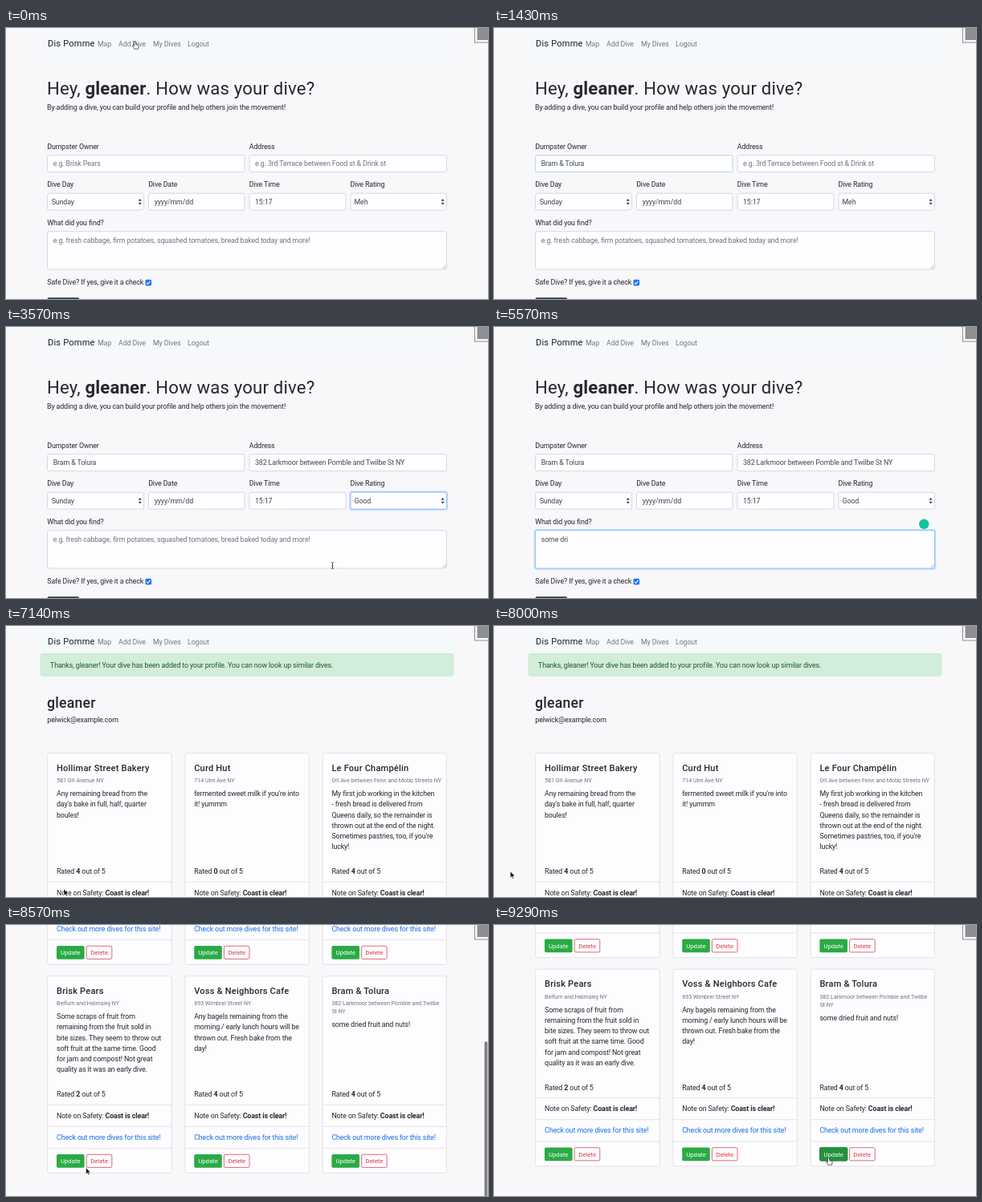
These frames come from a looping animation (600x338 px, 9.44 s). An HTML page:

```html
<!DOCTYPE html>
<html lang="en">
<head>
<meta charset="utf-8">
<title>Dive log</title>
<style>
html, body { margin: 0; width: 100%; height: 100%; overflow: hidden; background: #f8f7fa; }
svg { display: block; width: 600px; height: 338px; }
text { font-family: Roboto, Inter, sans-serif; white-space: pre; }
.b { font-weight: 700; }
</style>
</head>
<body>
<svg id="stage" viewBox="0 0 600 338"></svg>
<script>
const LOOP = 9440, STEPS_PER_MS = 0.007, LAST = 65;
const INK = '#24282c', GREY = '#6c757d', FIELD = '#43484e', EDGE = '#cdd1d7';
const BODY = 8.85, SMALL = 7.08, BUTTON = 7.74, TITLE = 11.06;
const USER = 'gleaner', OWNER = 'Bram & Tolura';
const PLACE = '382 Larkmoor between Pomble and Twilbe St NY';
const FOUND = 'some dried fruit and nuts!';

const bold = s => `<tspan class="b">${s}</tspan>`;
const within = (k, from, to) => k >= from && k < to;

// y is the middle of the capitals
function text(x, y, s, size = BODY, fill = INK, weight = 400) {
  const gap = size > 10 ? 0.2 : size > 8 ? -0.12 : 0;
  return `<text x="${x}" y="${y + 0.355 * size}" font-size="${size}" fill="${fill}" font-weight="${weight}" letter-spacing="${gap}">${s}</text>`;
}

function box(x, y, w, h, fill, stroke = 'none', r = 2.2, sw = 0.8) {
  return `<rect x="${x}" y="${y}" width="${w}" height="${h}" rx="${r}" fill="${fill}" stroke="${stroke}" stroke-width="${sw}"/>`;
}

const path = (d, fill, stroke = 'none', sw = 0.6) =>
  `<path d="${d}" fill="${fill}" stroke="${stroke}" stroke-width="${sw}" stroke-linejoin="round"/>`;

// focus: 0 none, 1 tinted border, 2 border with glow
function field(x, y, w, h, focus = 0) {
  const glow = focus > 1 ? box(x - 0.8, y - 0.8, w + 1.6, h + 1.6, 'none', '#b9d9fb', 3, 1.8) : '';
  return glow + box(x, y, w, h, '#fefdff', [EDGE, '#a6caf2', '#80bdff'][focus]);
}

const arrows = (x, y) => path(`M${x - 2} ${y - 1}l2-2.8 2 2.8zM${x - 2} ${y + 1}l2 2.8 2-2.8z`, '#343a40');

const nav = () => box(43, -1, 514, 39, '#f6f9fb', 'none', 0) +
  text(52, 19.5, 'Dis Pomme', TITLE, '#1c1f22') +
  [[114, 'Map'], [140, 'Add Dive'], [183, 'My Dives'], [226, 'Logout']]
    .map(([x, s]) => text(x, 19.5, s, BODY, '#77797c')).join('');

const count = (k, start, list) => k < start ? 0 : list[Math.min(k - start, list.length - 1)];

function form(k) {
  const owner = OWNER.slice(0, count(k, 5, [3, 6, 9, 11, 13]));
  const place = PLACE.slice(0, count(k, 11, [9, 18, 27, 36, 44]));
  const found = FOUND.slice(0, count(k, 36, [1, 3, 6, 8, 9, 13, 17, 22, 26]));
  const entry = (x, y, value, hint) => text(x, y, value || hint, BODY, value ? FIELD : GREY);
  const writing = within(k, 27, 47);
  return nav() +
    text(51, 75, `Hey, ${bold(USER)}. How was your dive?`, 22.1, INK, 400) +
    text(51, 99, 'By adding a dive, you can build your profile and help others join the movement!') +
    text(51.3, 147.8, 'Dumpster Owner') + text(302.8, 147.8, 'Address') +
    field(51.5, 158.7, 245.5, 20.9, +within(k, 4, 11)) + entry(58.7, 169.3, owner, 'e.g. Brisk Pears') +
    field(303, 158.7, 245.5, 20.9, +within(k, 11, 16)) +
    entry(310, 169.3, place, 'e.g. 3rd Terrace between Food st & Drink st') +
    text(51.3, 195.3, 'Dive Day') + text(177.2, 195.3, 'Dive Date') +
    text(302.8, 195.3, 'Dive Time') + text(428.5, 195.3, 'Dive Rating') +
    field(51.5, 206.2, 120, 20.9) + text(56.7, 216.8, 'Sunday', BODY, FIELD) + arrows(166.8, 216.8) +
    field(177.5, 206.2, 119.5, 20.9, +within(k, 17, 19)) + text(184.7, 216.8, 'yyyy/mm/dd', BODY, FIELD) +
    field(303, 206.2, 120, 20.9, +within(k, 19, 21)) + text(310, 216.8, '15:17', BODY, FIELD) +
    field(429, 206.2, 119.5, 20.9, within(k, 21, 27) ? 2 : 0) +
    text(433.5, 216.8, k < 23 ? 'Meh' : 'Good', BODY, FIELD) + arrows(543.6, 216.8) +
    text(51.3, 242.8, 'What did you find?') +
    field(51.5, 253.8, 497, 47.2, writing ? 2 : 0) +
    entry(58.7, 264.6, found, 'e.g. fresh cabbage, firm potatoes, squashed tomatoes, bread baked today and more!') +
    path('M543.5 300l4-4M546 300l1.5-1.5', 'none', '#8a8a8a') +
    (within(k, 34, 47) ? '<circle cx="535.3" cy="245.8" r="6.2" fill="#15c39a"/>' : '') +
    text(51.3, 317.3, 'Safe Dive? If yes, give it a check') +
    box(173.5, 313.8, 7.6, 7.6, '#2377f0', 'none', 1.6) +
    path('M175.2 317.8l1.5 1.7 2.7-3.7', 'none', '#fff', 1.1) +
    box(51.3, 336.3, 40, 21, '#343a40');
}

const CARDS = [
  ['Hollimar Street Bakery', ['581 Orl Avenue NY'], 4,
    ['Any remaining bread from the', "day's bake in full, half, quarter", 'boules!']],
  ['Curd Hut', ['714 Ulm Ave NY'], 0,
    ["fermented sweet milk if you're into", 'it! yummm']],
  ['Le Four Champélin', ['Orl Ave between Fenn and Mobb Streets NY'], 4,
    ['My first job working in the kitchen', '- fresh bread is delivered from', 'Queens daily, so the remainder is',
      'thrown out at the end of the night.', "Sometimes pastries, too, if you're", 'lucky!']],
  ['Brisk Pears', ['Belfurn and Halmsley NY'], 2,
    ['Some scraps of fruit from', 'remaining from the fruit sold in', 'bite sizes. They seem to throw out',
      'soft fruit at the same time. Good', 'for jam and compost! Not great', 'quality as it was an early dive.']],
  ['Voss & Neighbors Cafe', ['693 Wimbrel Street NY'], 4,
    ['Any bagels remaining from the', 'morning / early lunch hours will be', 'thrown out. Fresh bake from the', 'day!']],
  [OWNER, ['382 Larkmoor between Pomble and Twilbe', 'St NY'], 4, [FOUND]]
];

function card([name, address, rating, lines], i, hover) {
  const x = 51.7 + 171.2 * (i % 3), y = i < 3 ? 158.7 : 418.7, tx = x + 11.3;
  const top = y + 40.3 + 10 * address.length;
  return box(x, y, 154.4, 245.6, '#fdfcfe', '#dedde1') +
    text(tx, y + 18.3, name, TITLE, INK, 500) +
    address.map((s, n) => text(tx, y + 33.8 + 10 * n, s, SMALL, GREY)).join('') +
    lines.map((s, n) => text(tx, top + 13.25 * n, s)).join('') +
    text(tx, y + 147.3, `Rated ${bold(rating)} out of 5`) +
    [160.5, 187.5, 214.7].map(d => path(`M${x} ${y + d}h154.4`, 'none', '#dedde1', 0.8)).join('') +
    text(tx, y + 174, `Note on Safety: ${bold('Coast is clear!')}`) +
    text(tx, y + 201.1, 'Check out more dives for this site!', BODY, '#1470e2') +
    box(tx, y + 222.2, 34.6, 16.8, hover ? '#23923d' : '#2aaa46', hover ? '#1e7e34' : 'none', 1.8) +
    text(tx + 5, y + 230.6, 'Update', BUTTON, '#fff') +
    box(tx + 37.2, y + 222.5, 31.6, 16.2, 'none', '#d8455a', 1.8) +
    text(tx + 42.2, y + 230.6, 'Delete', BUTTON, '#d8394c');
}

function profile(k) {
  const scroll = count(k, 56, [0, 110, 243, 320, 355, 363.5]);
  const bar = within(k, 57, 64) ? box(595.6, 0.53 * scroll - 43, 3.8, 217, k > 62 ? '#c4c3c6' : '#7f7f82', 'none', 1.9) : '';
  return `<g transform="translate(0 ${-scroll})">` + nav() +
    box(43.3, 34.6, 513.5, 27.6, '#d2edd9', '#c3e6cb') +
    text(55, 48.6, `Thanks, ${USER}! Your dive has been added to your profile. You can now look up similar dives.`, BODY, '#1d5a2c') +
    text(51, 96, USER, 17.7, INK, 500) +
    text(51.3, 117, 'pelwick@example.com') +
    CARDS.map((c, i) => card(c, i, i === 5 && k > 63)).join('') + '</g>' + bar;
}

const POINTERS = {
  hand: path('M0 0Q1 0 1 1.2V3.7l2.6.5q1.2.4 1 1.6L4 9.2H-.6L-3 5.7q-.3-1.1.8-.9L-1 5.8V1.2Q-1 0 0 0z', '#fff', '#222', 0.7),
  arrow: path('M0 0V8l1.9-1.7 1.2 2.7 1.3-.6-1.2-2.5h2.6z', '#111', '#fff', 0.5),
  beam: path('M-1.7-4Q0-4 0-3Q0-4 1.7-4M0-3V3M-1.7 4Q0 4 0 3Q0 4 1.7 4M-.9.8H.9', 'none', '#333', 0.8),
  none: ''
};

// step, shape, x, y
const TRACK = [
  [0, 'hand', 160.5, 17], [1, 'arrow', 152, 50], [4, 'beam', 120, 170], [5, 'none', 120, 170],
  [24, 'beam', 430, 262], [25, 'beam', 406.5, 297.5], [27, 'beam', 390, 282], [35, 'none', 390, 282],
  [46, 'arrow', 200, 310], [48, 'hand', 72, 333], [50, 'arrow', 72, 328], [53, 'arrow', 72, 328],
  [56, 'arrow', 20.3, 306], [59, 'arrow', 20.3, 306], [64, 'hand', 416.5, 290]
];

function pointer(k) {
  const i = TRACK.findLastIndex(p => p[0] <= k);
  const [k0, shape, x0, y0] = TRACK[i], [k1, , x1, y1] = TRACK[i + 1] || [k0 + 1, '', x0, y0];
  const u = Math.min((k - k0) / (k1 - k0), 1);
  return `<g transform="translate(${x0 + (x1 - x0) * u} ${y0 + (y1 - y0) * u})">${POINTERS[shape]}</g>`;
}

const corner = box(583.5, -4, 24, 22, '#fafafa', '#8b8b8e', 0, 1) + box(586.5, -4, 20, 19, '#8f8f93', 'none', 0);

const stage = document.getElementById('stage');
const start = performance.now();
let shown = -1;

function draw() {
  const t = (performance.now() - start) % LOOP;
  const k = Math.min(LAST, Math.floor((t + 5) * STEPS_PER_MS));
  if (k !== shown) {
    stage.innerHTML = (k < 50 ? form(k) : profile(k)) + corner + pointer(k);
    shown = k;
  }
  requestAnimationFrame(draw);
}
draw();
</script>
</body>
</html>
```
